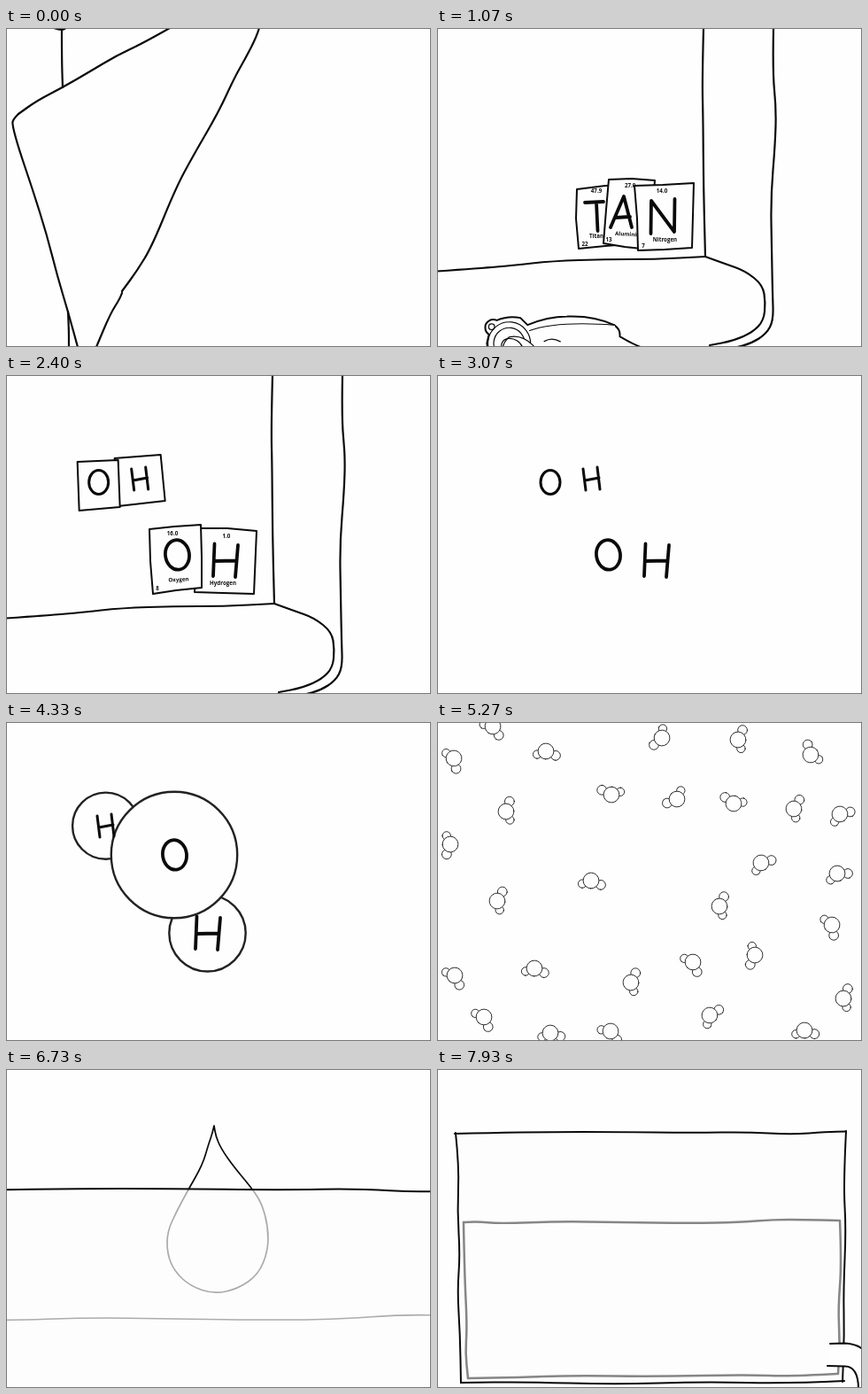
An HTML page for the animation above (8 s loop, 480 px wide and 360 px high).

```html
<!DOCTYPE html>
<html lang="en">
<head>
<meta charset="utf-8">
<title>Water sketch</title>
<style>
  html, body { margin: 0; width: 100%; height: 100%; overflow: hidden; background: #fefefe; }
  svg { display: block; width: 100vw; height: 100vh; }
  path, circle, ellipse, polygon, polyline { stroke: #0a0a0a; stroke-linecap: round; stroke-linejoin: round; fill: none; }
  .tile polygon { fill: #fefefe; stroke-width: 2; }
  .ink { stroke-width: 3.8; }
  .ink.s { stroke-width: 3; }
  text { font: 700 6.2px "Open Sans", "DejaVu Sans", sans-serif; fill: #111; text-anchor: middle; }
  text.l { text-anchor: start; }
  #hand path, #hand ellipse, #hand circle { stroke-width: 1.2; }
  #hand .cut { fill: #fefefe; stroke-width: 2; }
  #mols circle { fill: #fefefe; stroke: #222; vector-effect: non-scaling-stroke; }
  #drop path, #tank path { vector-effect: non-scaling-stroke; }
</style>
</head>
<body>
<svg id="stage" viewBox="0 0 480 360" preserveAspectRatio="none">
  <defs>
    <ellipse id="bigO" class="ink" cx="193.5" cy="203" rx="13.5" ry="16.8" transform="rotate(-8 193 203)"/>
    <path id="bigH" class="ink" d="M235.500 190.500L234 227M262 192L259 228M235 210L260.500 209.500"/>
    <ellipse id="smallO" class="ink s" cx="128" cy="121" rx="11" ry="13.500"/>
    <path id="smallH" class="ink s" d="M165 106L168 130M181 104L184 129M167 119L183 116"/>
  </defs>
  <rect width="480" height="360" fill="#fefefe"/>

  <g id="sheet" stroke-width="2.2"></g>

  <g id="room">
    <g id="walls" stroke-width="2.2"></g>
    <g id="tan">
      <g class="tile" id="tileT">
        <polygon points="158,182 190,178 222,177 228,243 190,246 160,249 157,215"/>
        <path class="ink" d="M167 197L188 196M180 197L181.500 229"/>
        <text x="180" y="186">47.9</text>
        <text x="172" y="237" class="l">Titanium</text>
        <text x="167" y="246">22</text>
      </g>
      <g class="tile" id="tileA">
        <polygon points="194,171 220,170 246,172 240,250 212,247 188,243 191,205"/>
        <path class="ink" d="M196 225L211 190L220 225M202 214L218 213"/>
        <text x="212" y="180" class="l">27.0</text>
        <text x="201" y="234" class="l" transform="rotate(3 201 234)">Aluminium</text>
        <text x="194" y="241">13</text>
      </g>
      <g class="tile" id="tileN">
        <polygon points="223,178 255,177 290,175 289,212 288,248 257,250 227,251 226,215"/>
        <path class="ink" d="M241.500 232L242 195L268 230L268.500 193"/>
        <text x="254" y="186">14.0</text>
        <text x="257.500" y="241">Nitrogen</text>
        <text x="233" y="248">7</text>
      </g>
    </g>
    <g id="oh">
      <g class="tile">
        <polygon points="216,173 250,173 283,176 280,247 245,246 213,245"/>
        <use href="#bigH"/>
        <text x="249" y="184">1.0</text>
        <text x="245" y="237">Hydrogen</text>
      </g>
      <g class="tile">
        <polygon points="162,174 190,171 220,169 221,205 221,240 192,243 166,247 163,210"/>
        <use href="#bigO"/>
        <text x="188" y="181">16.0</text>
        <text x="195" y="233" transform="rotate(-3 195 233)">Oxygen</text>
        <text x="171" y="243">8</text>
      </g>
    </g>
    <g id="pair">
      <g class="tile"><polygon points="146,94 198,90 203,142 150,148"/><use href="#smallH"/></g>
      <g class="tile"><polygon points="104,98 150,96 152,149 106,153"/><use href="#smallO"/></g>
    </g>
    <g id="hand">
      <path class="cut" d="M350 385L346 360Q349 325 357 300Q360 291 366 286Q353 280 357 268Q362 261 378 257L398 248Q384 240 387 227Q394 221 416 222Q420 209 440 204L450 205Q453 199 461 200Q469 204 467 212Q474 224 473 238L466 247Q478 268 481 290Q486 320 478 344Q474 352 466 352Q458 370 455 385Z"/>
      <circle cx="459" cy="207" r="3.300"/>
      <circle cx="443" cy="229" r="24"/>
      <circle cx="443" cy="229" r="17.500"/>
      <path fill="#fefefe" style="fill:#fefefe;stroke:none" d="M375 290Q408 262 424 230Q436 216 450 228Q455 242 444 256L470 262L478 345L362 360Z"/>
      <path d="M416 248Q402 246 393 236Q390 228 400 229L420 232"/>
      <path d="M400 264Q375 283 368 278Q362 270 378 263L410 255"/>
      <path d="M375 290Q392 278 408 262Q420 246 424 230Q436 216 450 228Q455 242 444 256Q430 270 424 285Q420 300 432 303"/>
      <ellipse cx="438" cy="233" rx="10" ry="13" transform="rotate(25 438 233)"/>
      <path d="M356 360Q362 315 375 290M460 250Q475 280 478 345"/>
      <path d="M428 272Q426 290 447 297M450 268Q456 276 452 286"/>
    </g>
  </g>

  <g id="mols"></g>
  <g id="letters">
    <use id="lo1" href="#smallO"/><use id="lh1" href="#smallH"/>
    <use id="lo2" href="#bigO"/><use id="lh2" href="#bigH"/>
  </g>

  <g id="drop" stroke-width="1.7"></g>
  <g id="tank" stroke-width="2"></g>

  <rect x=".5" y=".5" width="479" height="359" fill="none" stroke="#777"/>
</svg>
<script>
const $ = id => document.getElementById(id);
const NS = "http://www.w3.org/2000/svg";

function add(parent, tag, attrs) {
  const el = document.createElementNS(NS, tag);
  for (const k in attrs) el.setAttribute(k, attrs[k]);
  return parent.appendChild(el);
}

// Soft pen line through a few points, "x,y x,y ..."
function pen(parent, pts, attrs = {}) {
  const p = pts.split(" ").map(s => s.split(",").map(Number));
  let d = "M" + p[0];
  for (let i = 1; i < p.length - 1; i++) {
    const [a, b] = [p[i], p[i + 1]];
    d += "Q" + a + " " + (a[0] * .3 + b[0] * .7 + a[0] * .2 - b[0] * .2) + "," + (a[1] + b[1]) / 2;
  }
  d += "L" + p[p.length - 1];
  return add(parent, "path", { d, ...attrs });
}

const sheet = $("sheet");
pen(sheet, "185,0 155,17 125,31 95,49 64,67 35,82 14,97");
pen(sheet, "14,97 8,103 7,109 14,135 30,182 46,233 58,280 70,320 81,360");
pen(sheet, "286,0 283,10 270,35 258,56 240,95 212,143 192,180 165,246 148,274 131,297");
pen(sheet, "131,299 129,305 118,322 102,360");
pen(sheet, "63,3 63,35 64,67");
pen(sheet, "54,0 63,3 69,-1");
pen(sheet, "70,320 71,340 71,360");

const walls = $("walls");
pen(walls, "0,274.500 50,271 85,268 130,263 190,261 245,261 303,258");
pen(walls, "301,0 299.500,60 300.500,100 301,180 303,258");
pen(walls, "380,0 379,50 383,90 382,130 377,190 378,250 379,300 380,330 372,345 355,356 335,361");
pen(walls, "303,258 325,266 348,274 368,290 371,310 369,330 357,343 335,353 308,358");

// Molecules: x, y, heading
const field = [
  63,5,124, 19,41,146, 78,101,-3, 123,33,92, 15,138,178, 197,82,274,
  254,18,207, 271,87,226, 340,20,3, 422,37,322, 335,92,284, 403,98,10,
  455,104,56, 366,159,54, 452,171,68, 446,229,148, 319,208,3, 359,263,184,
  308,331,37, 289,271,135, 219,294,4, 110,278,93, 174,179,92, 68,202,7,
  20,286,132, 53,333,135, 128,351,87, 196,349,121, 459,312,2, 415,348,88
];
const mols = [];
for (let i = 0; i < field.length; i += 3) {
  const g = add($("mols"), "g", {});
  const part = (deg, dist, r) => add(g, "circle", {
    cx: Math.cos(deg * Math.PI / 180) * dist,
    cy: Math.sin(deg * Math.PI / 180) * dist, r
  });
  const parts = [part(-68, 12, 5.4), part(68, 10.5, 4.7), part(0, 0, 8.9)];
  mols.push({ g, parts, x: field[i], y: field[i + 1], rot: field[i + 2] });
}
const turn = (m, rot) =>
  m.g.setAttribute("transform", `translate(${m.x} ${m.y}) rotate(${rot})`);
mols.forEach(m => turn(m, m.rot));
const lead = mols.find(m => m.x === 174);

pen($("drop"), "235,64 233,73 229,84 222,108 206,136 193,160 182,184 182,208 190,228 208,245 235,254 262,248 285,232 296,205 296,178 289,152 278,135 257,110 243,90 237,76 235,64");

const tank = $("tank");
add(tank, "path", {
  d: "M21 73L130 71.500L290 72L400 73L461 70.500L461 353L200 355L27 354Z",
  style: "fill:#fefefe;fill-opacity:.66;stroke:none"
});
const water = [
  "30,173 45,172 70,174.500 140,172 200,173 290,174 340,173 380,170 415,170 454,171",
  "455,171 457,220 453,270 455,308 453,344",
  "452,344 400,347 350,345 250,347 150,346 90,348 35,349",
  "30,173 31,230 34,290 32,320 35,349"
].map(p => pen(tank, p));
pen(tank, "20,73 60,72 130,71 200,71 290,72 350,71 400,74 440,71 462,70.500");
pen(tank, "462,70 459,130 462,180 459,250 460,300 458,353");
pen(tank, "460,352 400,355 300,353 200,356 100,353 27,354");
pen(tank, "21,72 25,110 23,160 26,210 23,250 26,300 27,354");
add(tank, "path", {
  d: "M444 310L460 309.500Q476 310 482 317L482 362L476 362Q478 334 464 335L441 335Z",
  style: "fill:#fefefe;stroke:none"
});
add(tank, "path", { d: "M444 310L460 309.500Q474 310 482 317M441 335L460 335.500Q476 335 476 362" });

// Values at time t from rows [time, a, b, ...]
function at(t, rows, ease = u => u) {
  if (t <= rows[0][0]) return rows[0].slice(1);
  for (let i = 1; i < rows.length; i++) {
    const [a, b] = [rows[i - 1], rows[i]];
    if (t <= b[0]) {
      const u = ease((t - a[0]) / (b[0] - a[0]));
      return a.slice(1).map((v, j) => v + (b[j + 1] - v) * u);
    }
  }
  return rows[rows.length - 1].slice(1);
}
const smooth = u => u * u * (3 - 2 * u);
const out = u => 1 - (1 - u) * (1 - u);
const ramp = (t, a, b, ease = smooth) => at(t, [[a, 0], [b, 1]], ease)[0];
const mix = (a, b, u) => a + (b - a) * u;
const show = (el, on) => { el.style.display = on ? "" : "none"; };
const move = (el, x, y = 0) => el.setAttribute("transform", `translate(${x} ${y})`);

const handPath = [
  [933, 40, 440, -95], [1066, 80, 358, -83], [1333, 205, 215, -60],
  [1533, 340, 190, -25], [1733, 441, 228, 0], [1800, 482, 300, 10], [1867, 570, 440, 20]
];
const tankPath = [
  [6000, 1.44, -106, 268], [6733, 1.44, -106, 33], [6867, 1.44, -106, -31],
  [7733, 1.44, -106, -31], [7933, 1, 0, 0]
];

function drawRoom(t) {
  [["tileT", 500, 700], ["tileA", 600, 800], ["tileN", 720, 933]].forEach(([id, a, b]) =>
    move($(id), -310 * (1 - ramp(t, a, b, out))));
  show($("tan"), t < 1390);
  show($("oh"), t >= 1390);
  show($("pair"), t > 2010);
  move($("pair"), -210 * (1 - ramp(t, 2000, 2600, out)));
  show($("hand"), t > 960 && t < 1860);
  const [x, y, r] = at(t, handPath);
  $("hand").setAttribute("transform", `translate(${x} ${y}) rotate(${r}) translate(-441 -228)`);
}

function drawLetters(t) {
  const u = ramp(t, 3067, 3667);
  $("lo1").setAttribute("opacity", 1 - u);
  move($("lh1"), -62 * u);
  move($("lo2"), -3 * u, -53 * u);
  move($("lh2"), -20 * u, 29 * u);
  $("letters").setAttribute("opacity", 1 - ramp(t, 4400, 4600));
}

function drawMols(t) {
  const u = ramp(t, 4400, 5266);
  const s = Math.pow(8, 1 - u);
  const z = Math.pow(5, -ramp(t, 5267, 5867));
  $("mols").setAttribute("transform",
    `translate(238 190) scale(${z}) translate(-238 -190) ` +
    `translate(${mix(190, 174, u)} ${mix(150, 179, u)}) scale(${s}) translate(-174 -179)`);
  $("mols").setAttribute("stroke-width", mix(2.4, .95, u));
  $("mols").style.strokeWidth = mix(2.4, .95, u) * mix(.4, 1, z);
  $("mols").setAttribute("opacity", 1 - ramp(t, 5600, 5867));
  turn(lead, mix(135, 92, u));
  [4200, 4300, 4050].forEach((from, i) => show(lead.parts[i], t > from));
}

function drawDrop(t) {
  const z = Math.pow(5, 1 - ramp(t, 5267, 5867));
  const sink = ramp(t, 6867, 7733);
  $("drop").setAttribute("transform",
    `translate(238 ${175 + 38 * sink}) scale(${z}) translate(-238 -175)`);
  $("drop").setAttribute("opacity", 1 - sink);
}

function drawTank(t) {
  const [s, x, y] = at(t, tankPath);
  tank.setAttribute("transform", `translate(${x} ${y}) scale(${s})`);
  const u = ramp(t, 7733, 7933);
  const c = Math.round(mix(172, 134, u));
  water.forEach(p => {
    p.style.stroke = `rgb(${c},${c},${c})`;
    p.style.strokeWidth = mix(1.6, 2.5, u);
  });
}

function draw(t) {
  show(sheet, t < 460);
  move(sheet, -300 * ramp(t, 67, 467));
  show($("room"), t > 460 && t < 2860);
  show($("letters"), t > 2860 && t < 4640);
  show($("mols"), t > 4040 && t < 5860);
  show($("drop"), t > 5300 && t < 7730);
  show(tank, t > 6010);
  drawRoom(t);
  drawLetters(t);
  drawMols(t);
  drawDrop(t);
  drawTank(t);
}

// Drawn at 15 pictures a second, like a flip book
const begin = performance.now();
function tick() {
  const t = (performance.now() - begin) % 8000;
  draw(Math.floor((t + 5) * .015) / .015);
  requestAnimationFrame(tick);
}
draw(0);
requestAnimationFrame(tick);
</script>
</body>
</html>
```
